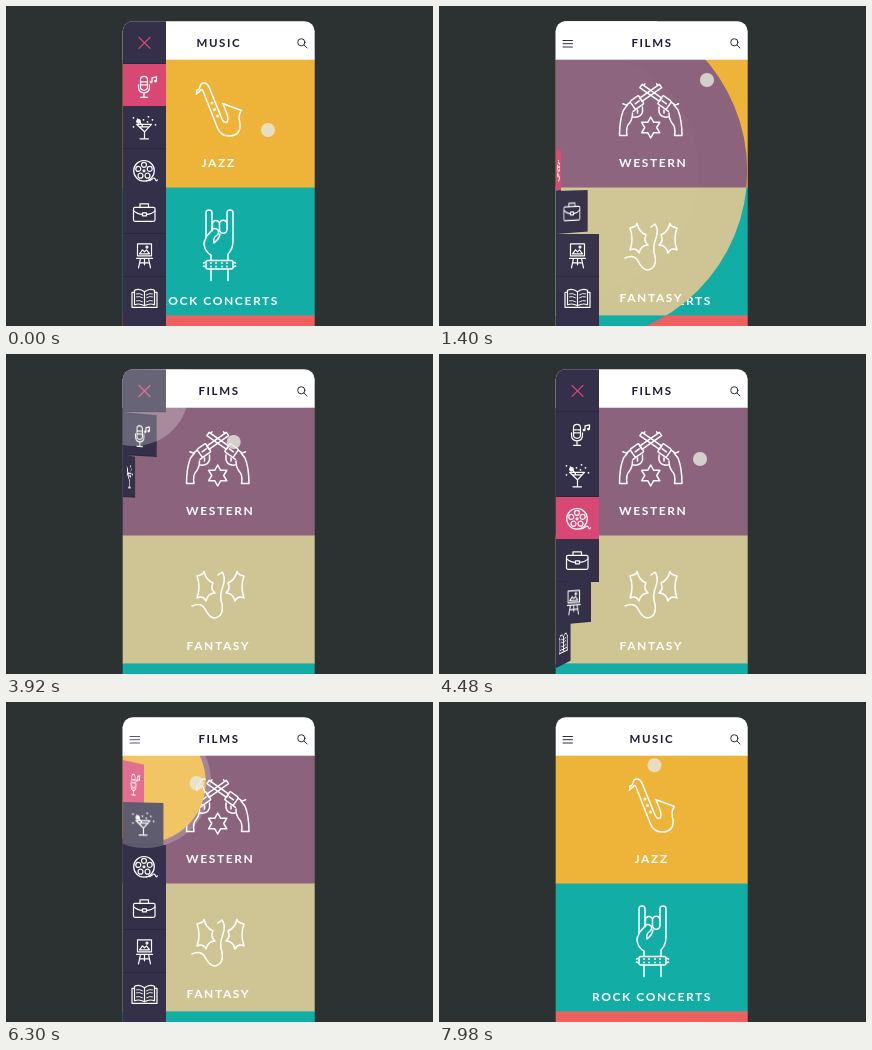
These frames come from a looping animation (427x320 px, 8 s). An HTML page:

```html
<!DOCTYPE html>
<html lang="en">
<head>
<meta charset="utf-8">
<title>Folding menu</title>
<style>
  html, body { margin: 0; width: 100%; height: 100%; overflow: hidden; background: #2b3231; }
  #stage { position: relative; width: 100%; height: 100%; overflow: hidden; }
  #phone, .page, #menu { position: absolute; inset: 0; overflow: hidden; }
  #phone { clip-path: inset(15.2px 118.3px 0 116.7px round 10px 10px 0 0); }
  #menu { perspective: 800px; perspective-origin: 138px 160px; z-index: 3; }
  .item {
    position: absolute; left: 116.6px; width: 43.2px; height: 43px; box-sizing: border-box;
    background: #343049; border-bottom: 1px solid #2a2741; transform-origin: 0 50%;
  }
  .item.active { background: #d94873; }
  .item svg { position: absolute; left: 0; top: 0; width: 43px; height: 43px; overflow: visible; }
  svg { display: block; fill: none; stroke: #fff; stroke-width: 1.5; stroke-linecap: round; stroke-linejoin: round; }
  .item svg { stroke-width: 1.2; }
  text { font: 700 12px Lato, "Open Sans", sans-serif; letter-spacing: 1.6px; fill: #fff; stroke: none; }
  .title { font-size: 11.5px; fill: #1c1a38; }
  .dot { fill: #fff; stroke: none; }
  #ripple, #cursor { position: absolute; left: 0; top: 0; border-radius: 50%; z-index: 4; }
  #ripple { background: #fff; }
  #cursor { width: 13.4px; height: 13.4px; margin: -6.7px; background: rgba(230, 232, 225, .8); z-index: 5; }
</style>
</head>
<body>
<div id="stage">
  <div id="phone">
    <div class="page" id="music"></div>
    <div class="page" id="films"></div>
    <div id="menu"></div>
    <div id="ripple"></div>
  </div>
  <div id="cursor"></div>
</div>
<script>
const LOOP = 8000, STEP = 70, STAGGER = 137, ITEM_H = 42.6, TOP = 15;
const $ = id => document.getElementById(id);
const clamp = v => Math.min(1, Math.max(0, v));
const path = (d, extra = '') => `<path d="${d}" ${extra}/>`;
const circle = (x, y, r, extra = '') => `<circle cx="${x}" cy="${y}" r="${r}" ${extra}/>`;
const dots = (r, ...points) => points.map(([x, y]) => circle(x, y, r, 'class="dot"')).join('');
const label = (x, y, s, extra = '') => `<text x="${x}" y="${y}" ${extra}>${s}</text>`;
const band = (y, h, color) => `<rect x="116" y="${y}" width="194" height="${h}" fill="${color}" stroke="none"/>`;
const ring = (n, fn) => Array.from({ length: n }, (_, i) => fn(i * 2 * Math.PI / n, i));
const mirrored = (shape, axis) => shape + `<g transform="translate(${2 * axis} 0) scale(-1 1)">${shape}</g>`;

const sax = path('M190.5 88 L191 84 Q193.500 84 194 80.500 Q195 76.500 198.500 77 Q201.500 77.500 203 81 L216 113 Q218 117.500 221 116 Q223 114 221 108 L217.500 99')
  + path('M234.500 106 Q232 110 234 118 Q235 129 224 130 Q215 130.500 211.500 122 L197 85 Q195.500 82 194 85 L190.500 88')
  + path('M216.500 97.500 L235.500 104.500') + dots(1.5, [206, 97], [208.5, 103.5], [211.5, 110]);

const hand = path('M206 225 V207 a3 3 0 0 0-6 0 V232 Q198 235 198 238 Q199 246 205 249 V254 M222 254 V248 Q227 243 227 235 V207 a3 3 0 0 0-6 0 V218')
  + path('M206.500 222 V218 a3.500 3.500 0 0 1 7 0 V225 M213.500 218 a3.500 3.500 0 0 1 7.500 0 V223 a3.500 3.500 0 0 1-7.500 1')
  + path('M200 231 L206 224 Q209 221 212 224 Q214 227 210 230 Q207 232 208 237 M214 228 Q213 233 209 236')
  + '<rect x="200" y="254.500" width="27" height="8.500" rx="2"/>'
  + path('M200 256 L197.500 257 M200 261 L197.500 260 M227 256 L229.500 257 M227 261 L229.500 260 M205 263 V274.500 M222 263 V274.500')
  + dots(.9, ...[205, 210, 216, 221].flatMap(x => [[x, 257], [x, 260.5]]));

const gun = `<g transform="translate(202 80) rotate(35)">
  ${path('M0 -2 H24 V2 H0 Z M2 -2 V-4 M34 -4 H39 L41 -7 M34 5 H37')}
  <rect x="23.500" y="-5" width="10.500" height="10" rx="1.500"/>${path('M26 0 H31')}</g>`
  + path('M235 99 L239 104 Q243 114 243 129.500 H235.500 Q237 121 233 117 Q230 113 230 107 M229 111 Q222 112 220 106 V101 M225 104 V107');
const star = ring(12, (a, i) => {
  const r = i % 2 ? 6 : 10.5;
  return `${(211.7 + r * Math.sin(a)).toFixed(1)},${(121.5 - r * Math.cos(a)).toFixed(1)}`;
});
const guns = mirrored(gun, 211.75) + `<polygon points="${star.join(' ')}"/>`;

const wing = path('M198 217.500 Q197 221 191 222 Q195 233 191 244 Q197 241 200 247 Q202 239 209 239 Q204 235 207 229 Q200 226 198 217.500');
const dragon = mirrored(wing, 214.5)
  + path('M212 221 L216 218 Q220 223 217 232 Q213 242 216 250 Q218 263 208 264 Q203 263 199 255 Q195 248 186 252');

const page = (titleX, title, colors, art) => `<svg width="427" height="320">
  ${band(15, 39, '#fff')}${band(53.7, 128.3, colors[0])}${band(181.5, 128.5, colors[1])}${band(309.4, 12, colors[2])}
  <g stroke="#302f3c" stroke-width="1">${path('M124 34.500 H133.500 M124 37.700 H133.500 M124 41 H133.500')}
  ${circle(295.3, 36.3, 3.6)}${path('M298 39 L301 42')}</g>
  ${label(titleX, 41, title, 'class="title"')}${art}</svg>`;

$('music').innerHTML = page(190.5, 'MUSIC', ['#eeb43a', '#12aea6', '#ef6061'],
  sax + label(195.5, 161, 'JAZZ') + hand + label(153, 298.5, 'ROCK CONCERTS'));
$('films').innerHTML = page(192.5, 'FILMS', ['#8c637c', '#cfc594', '#12aea6'],
  guns + label(180, 161, 'WESTERN') + dragon + label(180.5, 295.5, 'FANTASY'));

// Icons are drawn around the centre of their menu item.
const icons = [
  path('M-5.500 -5.500 L5.500 5.500 M5.500 -5.500 L-5.500 5.500', 'stroke="#e04a78"'),
  '<rect x="-4" y="-9.500" width="7" height="14" rx="3.500"/>'
    + path('M-6 -1 V1 Q-6 7 -.5 7 Q5 7 5 1 V-1 M-.5 7 V11.500 M-4 11.500 H3 M-4 -4 H-1 M-4 -1 H-1 M0 -4 H3 M0 -1 H3 M7.500 -4 V-8 L12 -9 V-5')
    + dots(1.4, [6.5, -3.7], [11, -4.7]),
  path('M-8 -3.500 H7 L0 4 Z M0 4 V11 M-4.500 11 H4 M-5 -1 H4.500 M-7 -9 L-2 -2')
    + circle(-6, -6.5, 1.8, 'fill="#fff"')
    + dots(.9, [-11, -10], [-1, -8], [4, -11], [8, -8], [-11, -1], [11, -3], [3, -6]),
  circle(-.5, 0, 10.3) + circle(-.5, 0, 1)
    + ring(5, a => circle((-.5 + 6 * Math.sin(a)).toFixed(1), (-6 * Math.cos(a)).toFixed(1), 2.5)).join('')
    + path('M2 10 Q6 10 8 8 Q10 6 11 9 Q12 11 13 9'),
  '<rect x="-11" y="-5.500" width="21.500" height="14" rx="1.500"/>'
    + path('M-4.500 -6 V-9 H4 V-6 M-11 -2 Q-7 1.500 -2 1.500 M10.500 -2 Q7 1.500 2 1.500') + '<rect x="-2" y="0" width="4" height="3"/>',
  '<rect x="-7" y="-12" width="14" height="12"/>'
    + path('M-8 2.500 H8 M-4 2.500 L-6 12 M4 2.500 L6 12 M0 2.500 V9 M-5 7 H5 M-5 -2 L-2 -6 L0 -4 L2 -6 L5 -2 Z') + circle(2.5, -8.7, 1),
  path('M0 -7 Q-5 -11 -10 -8.500 V6 Q-5 4 0 7 Q5 4 10 6 V-8.500 Q5 -11 0 -7 V7 M-10 -6.500 H-12.500 V8.500 H12.500 V-6.500 H10')
    + path('M-8 -5 Q-5 -6 -2 -4 M-8 -2 Q-5 -3 -2 -1 M-8 2 Q-5 1 -2 3 M8 -5 Q5 -6 2 -4 M8 -2 Q5 -3 2 -1 M8 2 Q5 1 2 3', 'stroke-width=".9"'),
  ''
];
$('menu').innerHTML = icons.map((icon, i) =>
  `<div class="item" style="top:${Math.round(TOP + i * ITEM_H)}px"><svg viewBox="-21.5 -21.8 43 43">${icon}</svg></div>`).join('');
const items = [...document.querySelectorAll('.item')];

// Time, x, y
const cursorPath = [
  [0, 262, 124], [70, 262, 124], [600, 139, 165], [875, 139, 165], [1360, 268, 74],
  [2940, 268, 74], [3430, 128, 37], [3570, 128, 37], [4037, 261, 105],
  [5390, 261, 105], [5810, 138, 80], [6120, 138, 80], [6610, 281, 83],
  [7770, 281, 83], [8260, 128, 37]
];
const clicks = [[630, 139, 165], [3570, 128, 37], [5880, 139, 80]];
const CLOSE_1 = 716, OPEN = 3585, CLOSE_2 = 5966, CLOSE_MS = 292, OPEN_MS = 340;
const REVEAL_1 = 854, REVEAL_2 = 6104;

function cursorAt(t) {
  const i = cursorPath.findIndex(key => key[0] > t);
  const [t0, x0, y0] = cursorPath[i - 1], [t1, x1, y1] = cursorPath[i];
  const k = (t - t0) / (t1 - t0);
  return [x0 + (x1 - x0) * k, y0 + (y1 - y0) * k];
}

// 0 = item lies flat, 1 = item is folded away
function fold(t, i) {
  const progress = (start, ms) => clamp((t - start - i * STAGGER) / ms);
  if (t < OPEN) return progress(CLOSE_1, CLOSE_MS);
  if (t < CLOSE_2) return 1 - progress(OPEN, OPEN_MS);
  return progress(CLOSE_2, CLOSE_MS);
}

function showPages(t) {
  const second = t >= REVEAL_2;
  const [top, under] = second ? ['music', 'films'] : ['films', 'music'];
  const r = Math.max(0, (t - (second ? REVEAL_2 : REVEAL_1)) * .31);
  const covered = r > 320;
  Object.assign($(top).style, {
    zIndex: 2, visibility: 'visible',
    clipPath: covered ? 'none' : `circle(${r}px at 139px ${second ? 80 : 165}px)`
  });
  Object.assign($(under).style, { zIndex: 1, visibility: covered ? 'hidden' : 'visible', clipPath: 'none' });
}

function render(t) {
  showPages(t);

  const active = t >= clicks[0][0] && t < clicks[2][0] ? 3 : 1;
  items.forEach((item, i) => {
    const p = fold(t, i);
    item.classList.toggle('active', i === active);
    item.style.transform = p ? `rotateY(${p * 90}deg)` : 'none';
    item.style.visibility = p < 1 ? 'visible' : 'hidden';
  });

  const [start, x, y] = clicks.findLast(click => click[0] <= t) || [t, 0, 0];
  const r = (t - start) * 11 / 70, ripple = $('ripple').style;
  ripple.opacity = .45 * (1 - clamp((t - start) / 800));
  ripple.width = ripple.height = Math.min(r, 130) * 2 + 'px';
  ripple.transform = `translate(${x}px, ${y}px) translate(-50%, -50%)`;

  const [cx, cy] = cursorAt(t);
  $('cursor').style.transform = `translate(${cx}px, ${cy}px)`;
}

const origin = performance.now();
function tick() {
  const t = (performance.now() - origin) % LOOP;
  render(Math.floor(t / STEP) * STEP);
  requestAnimationFrame(tick);
}
tick();
</script>
</body>
</html>
```
